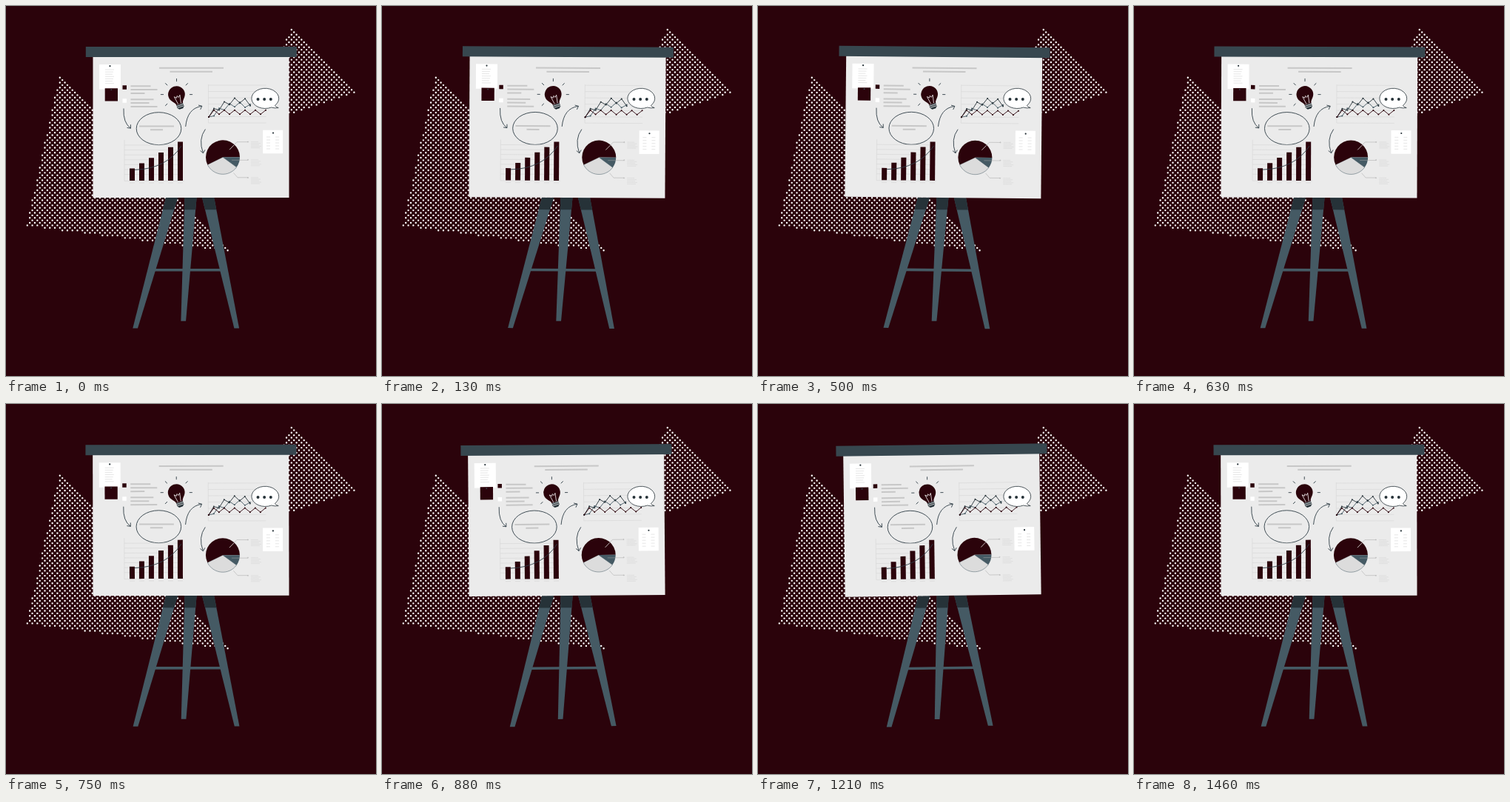
An HTML page that plays this animation: 500 px wide and 500 px high, repeating every 1.5 s.

```html
<!DOCTYPE html>
<html lang="en">
<head>
<meta charset="utf-8">
<title>Presentation board</title>
<style>
html, body { margin: 0; width: 100%; height: 100%; overflow: hidden; background: #2b030b; }
svg { display: block; width: 100vw; height: 100vh; }
.maroon { fill: #2b030b; }
.slate { fill: #455a64; }
.steel { fill: #37474f; }
.dark { fill: #263238; }
.white { fill: #fff; }
.light { fill: #dcdcdc; stroke: #455a64; stroke-width: .5; }
.copy { stroke: #c7c7c7; stroke-width: 2; }
.hair { stroke: #d6d6d6; stroke-width: .6; fill: none; }
.pointer { stroke: #a5a5a5; stroke-width: .5; fill: none; }
.ink { stroke: #2f3e46; stroke-width: .9; fill: none; }
.wire { stroke: #fff; stroke-width: .7; fill: none; }
</style>
</head>
<body>
<svg viewBox="0 0 500 500">
  <rect width="500" height="500" class="maroon"/>
  <g id="halftone"></g>
  <g id="easel">
    <rect class="slate" x="201" y="355" width="90" height="3.6"/>
    <g id="legs"></g>
    <rect x="117.5" y="68" width="265" height="191" fill="#ebebeb"/>
    <rect class="steel" x="107.8" y="55" width="285" height="14"/>
    <g id="board"></g>
    <g id="bulb" transform="translate(230.5 119.6)">
      <g transform="rotate(-18)">
        <path class="maroon" d="M-4.7 13.5C-4.7 9.5 -11.4 7 -11.4 0A11.4 11.4 0 0 1 11.4 0C11.4 7 4.7 9.5 4.7 13.5Z"/>
        <path class="wire" d="M-2 13L-4 2L-1.5 4.5L0 2L1.5 4.5L4 2L2 13"/>
        <path class="dark" d="M-4.7 13.7H4.7V18L2.5 20.5H-2.5L-4.7 18Z"/>
        <path class="wire" d="M-4.7 15.3H4.7M-4.5 17.5H4.5"/>
      </g>
    </g>
  </g>
  <path d="M363.4 134.4Q365 137 368.2 137.6Q363 138.4 358.6 137A18.4 13.6 0 1 1 363.4 134.4Z" fill="#fff" stroke="#263238" stroke-width=".8"/>
  <g id="bubble"></g>
</svg>
<script>
const LOOP = 1500;
const $ = id => document.getElementById(id);

function add(parent, tag, attrs) {
  const el = document.createElementNS('http://www.w3.org/2000/svg', tag);
  for (const k in attrs) el.setAttribute(k, attrs[k]);
  $(parent).appendChild(el);
}
const path = (cls, d, parent = 'board') => add(parent, 'path', { class: cls, d });
const box = (cls, x, y, width, height) => add('board', 'rect', { class: cls, x, y, width, height });
const dot = (cls, cx, cy, r, parent = 'board') => add(parent, 'circle', { class: cls, cx, cy, r });
const row = (cls, x, y, w) => path(cls, `M${x} ${y}h${w}`);
const repeat = (n, fn) => Array.from({ length: n }, (_, i) => fn(i));

// Staggered dots inside a triangle; the lattice starts at its first corner
function halftone(a, b, c) {
  const half = 3.385, r = 1.2;
  const side = (p, q, x, y) =>
    ((q[0] - p[0]) * (y - p[1]) - (q[1] - p[1]) * (x - p[0])) / Math.hypot(q[0] - p[0], q[1] - p[1]);
  let d = '';
  for (let j = 0; j < 80; j++) {
    for (let i = -90; i < 90; i++) {
      const x = a[0] + i * half, y = a[1] + j * half;
      const inside = Math.min(side(a, b, x, y), side(b, c, x, y), side(c, a, x, y)) > -1;
      if ((i + j) % 2 === 0 && inside) d += `M${x - r} ${y}a${r} ${r} 0 1 0 ${2 * r} 0a${r} ${r} 0 1 0 ${-2 * r} 0`;
    }
  }
  path('white', d, 'halftone');
}
halftone([72.8, 96.7], [299.6, 330.3], [28.8, 296.4]);
halftone([385.8, 32], [470.5, 117], [325, 163]);

// Each leg tapers from the board to the floor; its top is in shadow
function leg(top, foot, floor) {
  const mix = (a, b, y) => a + (b - a) * (y - 259) / (floor - 259);
  const part = (cls, y) =>
    path(cls, `M${top} 259h16.2L${mix(top + 16.2, foot + 6.7, y)} ${y}H${mix(top, foot, y)}Z`, 'legs');
  part('slate', floor);
  part('dark', 275.3);
}
leg(216, 171.3, 435.6);
leg(265, 308.4, 435.6);
leg(241.4, 236.4, 425.8);

// Headline and legend
row('copy', 207, 83.8, 87);
row('copy', 221.5, 88.8, 57.5);
['maroon', 'white'].forEach((cls, k) => {
  const y = 108.2 + k * 18;
  box(cls, 157.5, y - 1, 5.5, 5.5);
  repeat(3, i => row('copy', 168.5, y + i * 4.9, [27, 36, 19, 31, 25, 36][k * 3 + i]));
});

// Pinned notes
box('white', 126, 79, 29, 33.5);
box('maroon', 133.7, 111.3, 17.3, 17.3);
box('white', 347.2, 167.7, 27, 31.6);
dot('dark', 140.5, 81.2, 1.1);
dot('steel', 142.3, 113.2, .9);
dot('dark', 361, 171.6, 1.1);
repeat(7, i => row('hair', 134, 86 + i * 3.1, 12 - i % 3));
repeat(5, i => [352, 364].forEach(x => row('hair', x, 177 + i * 4, 5)));

// Idea bubble and the arrows around it
add('board', 'ellipse', { class: 'ink', cx: 206.5, cy: 165.7, rx: 30.3, ry: 22 });
row('copy', 180, 162.4, 47);
row('copy', 195, 167.2, 17);

function arrow(x1, y1, cx, cy, x2, y2) {
  const back = Math.atan2(y1 - y2, x1 - x2) * .4 + Math.atan2(cy - y2, cx - x2) * .6;
  const barb = turn => `M${x2} ${y2}l${5 * Math.cos(back + turn)} ${5 * Math.sin(back + turn)}`;
  path('ink', `M${x1} ${y1}Q${cx} ${cy} ${x2} ${y2}` + barb(.7) + barb(-.7));
}
arrow(159, 138.5, 158, 158, 168.5, 165.2);
arrow(242.7, 163, 245, 138, 264.8, 135.3);
arrow(269.4, 166.5, 259.5, 180, 266.4, 198.7);

repeat(6, i => add('bulb', 'path', { class: 'ink', d: 'M17.5 0H21.6', transform: `rotate(${135 + i * 45})` }));

// Bar chart
path('hair', 'M160 181V236.5H241');
repeat(7, i => row('hair', 160, 188 + i * 6.6, 76));
repeat(6, i => {
  const x = 167 + i * 13, h = 16.4 + i * 7.2;
  box('maroon', x, 236 - h, 7, h);
  row('hair', x, 239, 7);
});
path('ink', 'M174 221.4Q217 220 237 189');

// Line chart: a rising arch plus a zigzag
path('hair', 'M273.5 106V158');
repeat(7, i => row('hair', 273.5, 107 + i * 8.5, 78));
function trend(color, n, arch, zig, lift) {
  const pts = repeat(n, i => [
    274 + i * 7,
    150 - arch * Math.sin(Math.PI * i / 11.5) + (i ? lift + (i % 2 ? -zig : zig) : 0)
  ]);
  add('board', 'polyline', { points: pts.join(' '), fill: 'none', stroke: color, 'stroke-width': .9 });
  pts.forEach(([cx, cy]) => add('board', 'circle', { cx, cy, r: 1, fill: color }));
}
trend('#455a64', 9, 17, -3, 0);
trend('#263238', 9, 20, 3.5, -2.5);
trend('#2b030b', 12, 0, 2.8, -6.5);

// Pie with callouts
function slice(cls, from, to) {
  const at = deg => [293 + 23 * Math.cos(deg * Math.PI / 180), 204.3 + 23 * Math.sin(deg * Math.PI / 180)];
  path(cls, `M293 204.3L${at(from)}A23 23 0 ${to - from > 180 ? 1 : 0} 1 ${at(to)}Z`);
}
slice('light', 36, 154);
slice('maroon', 154, 360);
slice('slate', 0, 36);
path('wire', 'M302 194.2L308 188');
path('pointer', 'M308 188L312 183.7H327M305 208.3H327M307.5 225.5L313 231.8H327');
repeat(3, k => {
  const y = 183.6 + k * 24.2;
  dot('pointer', 327, y, .6);
  repeat(5, i => row('hair', 331, y + i * 2, 10 + i * 3 % 5));
});

repeat(3, i => dot('dark', 340.5 + i * 8.65, 126, 2, 'bubble'));

// Sway angle in degrees by time in the loop
const sway = [[0, 0], [350, .93], [1105, -1.02], [LOOP, 0]];

function draw(now) {
  const t = now % LOOP;
  const i = sway.findIndex(([end]) => t < end);
  const [t0, a0] = sway[i - 1], [t1, a1] = sway[i];
  const angle = a0 + (a1 - a0) * (t - t0) / (t1 - t0);
  $('easel').setAttribute('transform', `rotate(${angle.toFixed(4)} 250.4 245.5)`);
}

const start = performance.now();
function tick() {
  draw(Math.max(0, performance.now() - start));
  requestAnimationFrame(tick);
}
tick();
</script>
</body>
</html>
```
